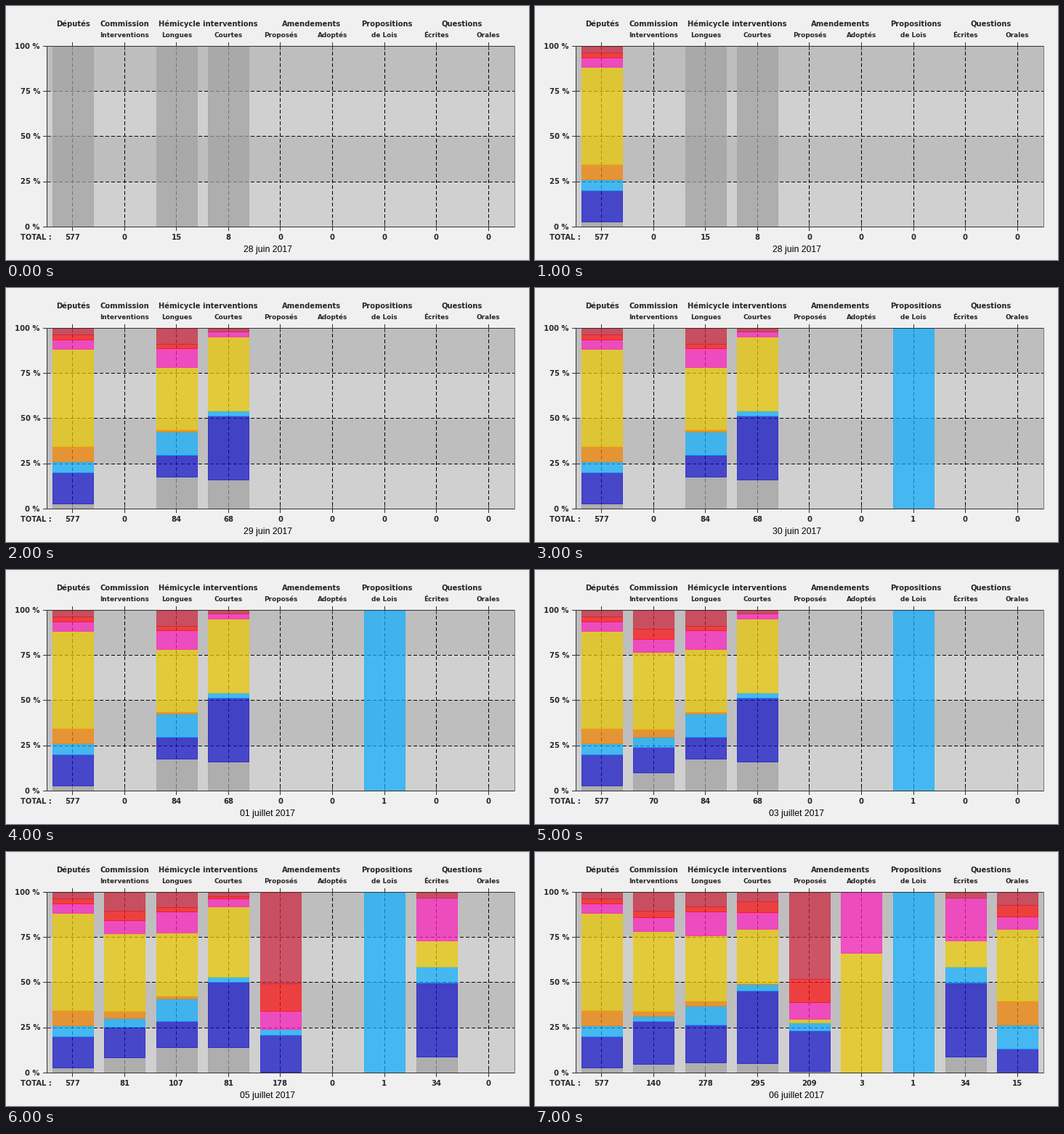
Animation, 720 px wide and 350 px high, one loop 8 s. Source, as a matplotlib script:

```python
import matplotlib.pyplot as plt
import numpy as np
from matplotlib.animation import FuncAnimation
from matplotlib.patches import Rectangle

W, H, DPI = 720, 350, 100
PX = 72 / DPI  # one pixel in points
LEFT, RIGHT, TOP, BOTTOM = 56, 700, 55, 304
PITCH, BAR_W, BAR_H = 71.56, 56, 248
QUARTER = 62.2
INK = "#262626"

# Parliamentary groups, stacked from the bottom up
GROUPS = ["#a2a2a2", "#1212c8", "#10b0ff", "#f58400",
          "#eac800", "#ff20be", "#ff0f0f", "#cc253c"]

DATES = ["28 juin", "28 juin", "29 juin", "30 juin",
         "01 juillet", "03 juillet", "05 juillet", "06 juillet"]

HEADERS = [(93, "Députés"), (163.5, "Commission"),
           (278, "Hémicycle interventions"), (421, "Amendements"),
           (524.5, "Propositions"), (628, "Questions")]

# Per column: subtitle and, by step, the count of each group.
# A bare total is filled in between the counts around it.
COLUMNS = [
    ("", {0: [577], 1: [17, 100, 35, 47, 312, 32, 16, 18]}),
    ("Interventions", {5: [7, 10, 4, 3, 30, 5, 4, 7], 6: 81,
                       7: [7, 33, 4, 4, 62, 11, 5, 14]}),
    ("Longues", {0: [15], 2: [15, 10, 11, 1, 29, 9, 2, 7], 6: 107,
                 7: [16, 58, 29, 8, 101, 37, 8, 21]}),
    ("Courtes", {0: [8], 2: [11, 24, 2, 0, 28, 2, 0, 1], 6: 81,
                 7: [16, 119, 10, 1, 89, 28, 18, 14]}),
    ("Proposés", {6: [1, 36, 6, 0, 0, 18, 27, 90],
                  7: [2, 47, 9, 0, 4, 20, 27, 100]}),
    ("Adoptés", {7: [0, 0, 0, 0, 2, 1]}),
    ("de Lois", {3: [0, 0, 1]}),
    ("Écrites", {6: [3, 14, 3, 0, 5, 8, 0, 1]}),
    ("Orales", {7: [0, 2, 2, 2, 6, 1, 1, 1]}),
]

fig = plt.figure(figsize=(W / DPI, H / DPI), dpi=DPI, facecolor="#f0f0f0")
ax = fig.add_axes([0, 0, 1, 1])
ax.set_xlim(0, W)
ax.set_ylim(H, 0)
ax.axis("off")


def label(x, y, text, size=10, ha="center", family="DejaVu Sans", weight="bold",
          color=INK):
    return ax.text(x, y, text, ha=ha, va="baseline", fontsize=size * PX,
                   family=family, weight=weight, color=color, zorder=5)


def stroke(xs, ys, color, dashed, z):
    ax.plot(xs, ys, color=color, ls=(0, (5, 3)) if dashed else "-", lw=PX,
            solid_capstyle="butt", dash_capstyle="butt", snap=False, zorder=z)


def hline(x0, x1, y, color="#333333", dashed=False, z=2):
    y = round(y) + 0.5
    stroke([x0, x1], [y, y], color, dashed, z)


def vline(x, y0, y1, color="#333333", dashed=False, z=2):
    x = round(x) + 0.5
    stroke([x, x], [y0, y1], color, dashed, z)


def center(col):
    return 91.2 + PITCH * col


def draw_grid():
    for i in range(4):
        ax.add_patch(Rectangle((LEFT, TOP + i * QUARTER), RIGHT - LEFT, QUARTER,
                               fc="#d0d0d0" if i % 2 else "#bebebe", lw=0, zorder=1))
    for i in range(5):
        y = TOP + i * QUARTER
        if 0 < i < 4:
            hline(LEFT + 1, RIGHT, y, "black", dashed=True)
        hline(LEFT - 5, LEFT + 6, y)
        label(47, y + 3.7, f"{100 - 25 * i} %", ha="right")
    for col, (name, _) in enumerate(COLUMNS):
        x = center(col)
        vline(x, TOP, BOTTOM, "black", dashed=True)
        for y in (TOP, BOTTOM):
            vline(x, y - 5, y + 6)
        label(x + 0.5, 43, name, 8.9)
    for y in (TOP, BOTTOM):
        hline(LEFT, RIGHT + 1, y, z=4)
    vline(LEFT, TOP, BOTTOM + 1, z=4)
    vline(RIGHT, TOP, BOTTOM + 1, "#777777", z=4)
    for x, name in HEADERS:
        label(x, 27.7, name)
    label(19.5, 322, "TOTAL :", 9.9, ha="left")


def counts_at(history, step):
    past = [s for s in history if s <= step]
    if not past:
        return np.zeros(len(GROUPS))

    def known(s):
        return np.pad(np.array(history[s], float), (0, len(GROUPS) - len(history[s])))

    now = past[-1]
    if isinstance(history[now], list):
        return known(now)
    before, after = known(past[-2]), known(min(s for s in history if s > now))
    t = (history[now] - before.sum()) / (after.sum() - before.sum())
    return before + t * (after - before)


def draw_bar(col, counts):
    x = int(64.1 + PITCH * col) + 0.5
    edges = BOTTOM - BAR_H * np.cumsum(counts) / counts.sum()
    low = BOTTOM
    for color, edge in zip(GROUPS, edges):
        top = round(edge)
        if top < low:
            bars.append(ax.add_patch(Rectangle(
                (x, top + 0.5), BAR_W, low - top, fc=(color, 0.72), ec=(color, 0.7),
                lw=PX, zorder=3, snap=False)))
        low = top


draw_grid()
totals = [label(center(col) + 0.3, 322, "0") for col in range(len(COLUMNS))]
date_label = label(360.5, 339, "", 12.3, family="Liberation Sans",
                   weight="normal", color="black")
bars = []


def update(step):
    while bars:
        bars.pop().remove()
    for col, (_, history) in enumerate(COLUMNS):
        counts = counts_at(history, step)
        totals[col].set_text(f"{counts.sum():.0f}")
        if counts.any():
            draw_bar(col, counts)
    date_label.set_text(f"{DATES[step]} 2017")
    return bars + totals + [date_label]


anim = FuncAnimation(fig, update, frames=len(DATES), interval=1000,
                     repeat=True, repeat_delay=0, blit=False)
plt.show()
```
